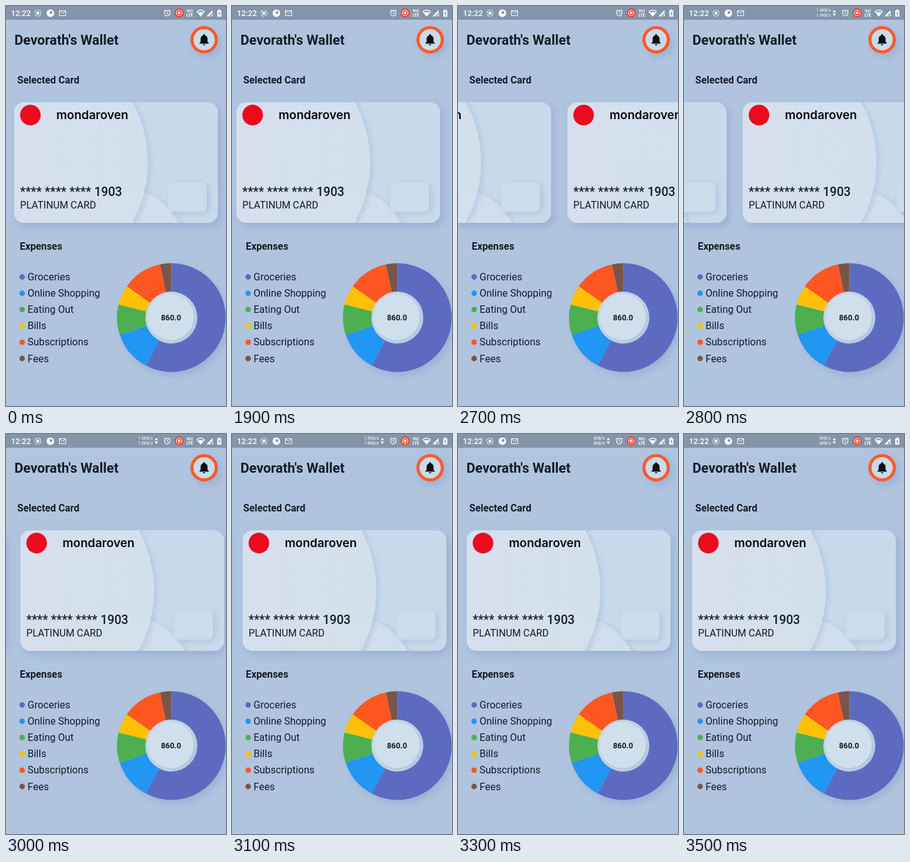
An HTML page that plays this animation: 352x640 px, repeating every 4400 ms.

```html
<!DOCTYPE html>
<html lang="en">
<head>
<meta charset="utf-8">
<title>Wallet</title>
<style>
  html, body { margin: 0; width: 100%; height: 100%; overflow: hidden; background: #b0c4de; }
  svg { display: block; width: 100vw; height: 100vh; font-family: Roboto, sans-serif; fill: #141c26; }
  .bold { font-weight: 700; }
  .raised { filter: drop-shadow(5px 6px 6px rgba(122, 148, 200, .38)); }
  .soft { filter: drop-shadow(4px 3px 5px rgba(122, 150, 200, .3)); }
  .line { fill: none; stroke: #fff; }
  .tiny { font-size: 6.6px; text-anchor: end; }
</style>
</head>
<body>
<svg viewBox="0 0 352 640">
  <defs>
    <linearGradient id="sheen">
      <stop offset=".45" stop-color="#d7dfee"/>
      <stop offset="1" stop-color="#d3e0ed"/>
    </linearGradient>
    <clipPath id="rounded"><rect width="326" height="193" rx="16"/></clipPath>
    <g id="card">
      <rect class="raised" width="326" height="193" rx="16" fill="#c8daea"/>
      <g clip-path="url(#rounded)">
        <circle class="soft" cx="174" cy="238" r="100" fill="#d1dfec"/>
        <circle class="soft" cx="14" cy="96" r="200" fill="url(#sheen)" opacity=".9"/>
        <rect class="soft" x="246" y="128" width="62" height="47" rx="7" fill="#cbdcea"/>
      </g>
      <circle cx="26" cy="20.5" r="16.5" fill="#eb0a1e"/>
      <text x="67.5" y="27" font-family="Inter, sans-serif" font-size="19" font-weight="600" fill="#080a0e">mondaroven</text>
      <text x="9.5" y="150" font-size="19.6" font-weight="500">**** **** **** 1903</text>
      <text x="9.5" y="170" font-size="15.8">PLATINUM CARD</text>
    </g>
  </defs>

  <rect width="352" height="640" fill="#b0c4de"/>
  <g id="cards">
    <use href="#card"/>
    <use href="#card" x="352"/>
  </g>

  <rect width="352" height="22" fill="#8495a9"/>
  <g fill="#fff">
    <text x="8" y="15.5" font-size="12.5" font-weight="500">12:22</text>
    <circle class="line" cx="51" cy="11.5" r="5" stroke-dasharray="6.4 1.45"/>
    <circle cx="51" cy="11.5" r="2.4"/>
    <circle cx="71" cy="11.5" r="6"/>
    <path d="M70 8.5h4v4h-4z" fill="#8495a9"/>
    <path class="line" d="M85.5 7.5h10v8h-10zM86 8l4.5 4L95 8"/>
    <g id="speed">
      <text class="tiny" x="235" y="9"></text>
      <text class="tiny" x="235" y="17"></text>
      <path d="M238 10l2.5-4 2.5 4zM238 12l2.5 4 2.5-4z"/>
    </g>
    <circle class="line" cx="258" cy="11.5" r="4.3" stroke-width="1.2"/>
    <path class="line" d="M258 9v3l2 1.2M252.5 8.3l3-2.5M263.5 8.3l-3-2.5"/>
    <circle cx="277" cy="11" r="7.2" fill="#f4382b"/>
    <circle class="line" cx="277" cy="11" r="4.5" stroke-width="1.2"/>
    <circle cx="277" cy="11" r="2.3"/>
    <g font-size="6.5" font-weight="700" text-anchor="middle">
      <text x="294" y="10">Vo)</text>
      <text x="294" y="16.5">LTE</text>
    </g>
    <path class="line" d="M305.7 9Q311.5 4 317.3 9L311.5 16z" stroke-width="1.3"/>
    <path d="M307.5 11Q311.5 8 315.5 11L311.5 16z"/>
    <path d="M320.5 16.5l10-10v6h-3.5v4z"/>
    <path class="line" d="M328.5 13.5l3 3m0-3l-3 3"/>
    <path d="M338 7h2V5.5h2.5V7h2v10h-6.5z"/>
    <path d="M341.8 8l-2.3 4.5h1.6V16l2.2-4.5h-1.5z" fill="#8495a9"/>
  </g>

  <g class="bold">
    <text x="13.5" y="61.5" font-size="21.7">Devorath's Wallet</text>
    <text x="18" y="123.5" font-size="15.8">Selected Card</text>
    <text x="22" y="389.5" font-size="15.8">Expenses</text>
  </g>

  <circle class="raised" cx="317" cy="54" r="22" fill="#ff5a2a"/>
  <circle cx="317" cy="54" r="17" fill="#c9dbea"/>
  <path transform="translate(305.8 42.6) scale(.93)" d="M12 22c1.1 0 2-.9 2-2h-4c0 1.1.9 2 2 2zm6-6v-5c0-3.07-1.64-5.64-4.5-6.32V4a1.5 1.5 0 0 0-3 0v.68C7.63 5.36 6 7.92 6 11v5l-2 2v1h16v-1z" fill="#0c1118"/>

  <g id="legend" font-size="16"></g>
  <g class="raised">
    <g id="donut" transform="translate(264.5 498.5) rotate(-90)" fill="none" stroke-width="46"></g>
  </g>
  <circle cx="264.5" cy="498.5" r="41.5" fill="#c5d7e7"/>
  <circle class="soft" cx="263.5" cy="497.5" r="37" fill="#cfdfec"/>
  <text class="bold" x="264" y="502.7" font-size="12.4" text-anchor="middle">860.0</text>
</svg>
<script>
const $ = id => document.getElementById(id);

function add(parent, tag, attrs, text = '') {
  const el = document.createElementNS('http://www.w3.org/2000/svg', tag);
  for (const key in attrs) el.setAttribute(key, attrs[key]);
  el.textContent = text;
  parent.append(el);
}

// label, colour, end angle in degrees
const expenses = [
  ['Groceries', '#5c6bc0', 208],
  ['Online Shopping', '#2196f3', 251.5],
  ['Eating Out', '#4caf50', 284],
  ['Bills', '#ffc107', 305],
  ['Subscriptions', '#ff5722', 348],
  ['Fees', '#795548', 360],
];
let start = 0;
expenses.forEach(([label, color, end], i) => {
  const y = 433.5 + 26.1 * i;
  add($('legend'), 'circle', { cx: 25.8, cy: y, r: 4.4, fill: color });
  add($('legend'), 'text', { x: 34.5, y: y + 5.5 }, label);
  add($('donut'), 'circle', {
    r: 64, stroke: color, pathLength: 360,
    'stroke-dasharray': `${end - start} 360`, 'stroke-dashoffset': -start,
  });
  start = end;
});

const LOOP = 4400, SWIPE = 2700;
const settle = [162, 81, 25, 10, 4, 2, 1, 0.5, 0]; // distance left, every 100 ms

function cardX(t) {
  if (t < 1900) return 13;
  if (t < SWIPE) return 7;
  const step = Math.min(Math.floor((t - SWIPE) / 100), settle.length - 1);
  return 13 - 352 + settle[step];
}

function draw(now) {
  const t = now % LOOP;
  $('cards').setAttribute('transform', `translate(${cardX(t)} 154)`);
  $('speed').style.display = t < 2800 ? 'none' : '';
  const rate = t < 3300 ? '1.6KB/s' : '8KB/s';
  for (const el of $('speed').querySelectorAll('text')) el.textContent = rate;
}

const began = performance.now();
function tick() {
  draw(performance.now() - began);
  requestAnimationFrame(tick);
}
tick();
</script>
</body>
</html>
```
